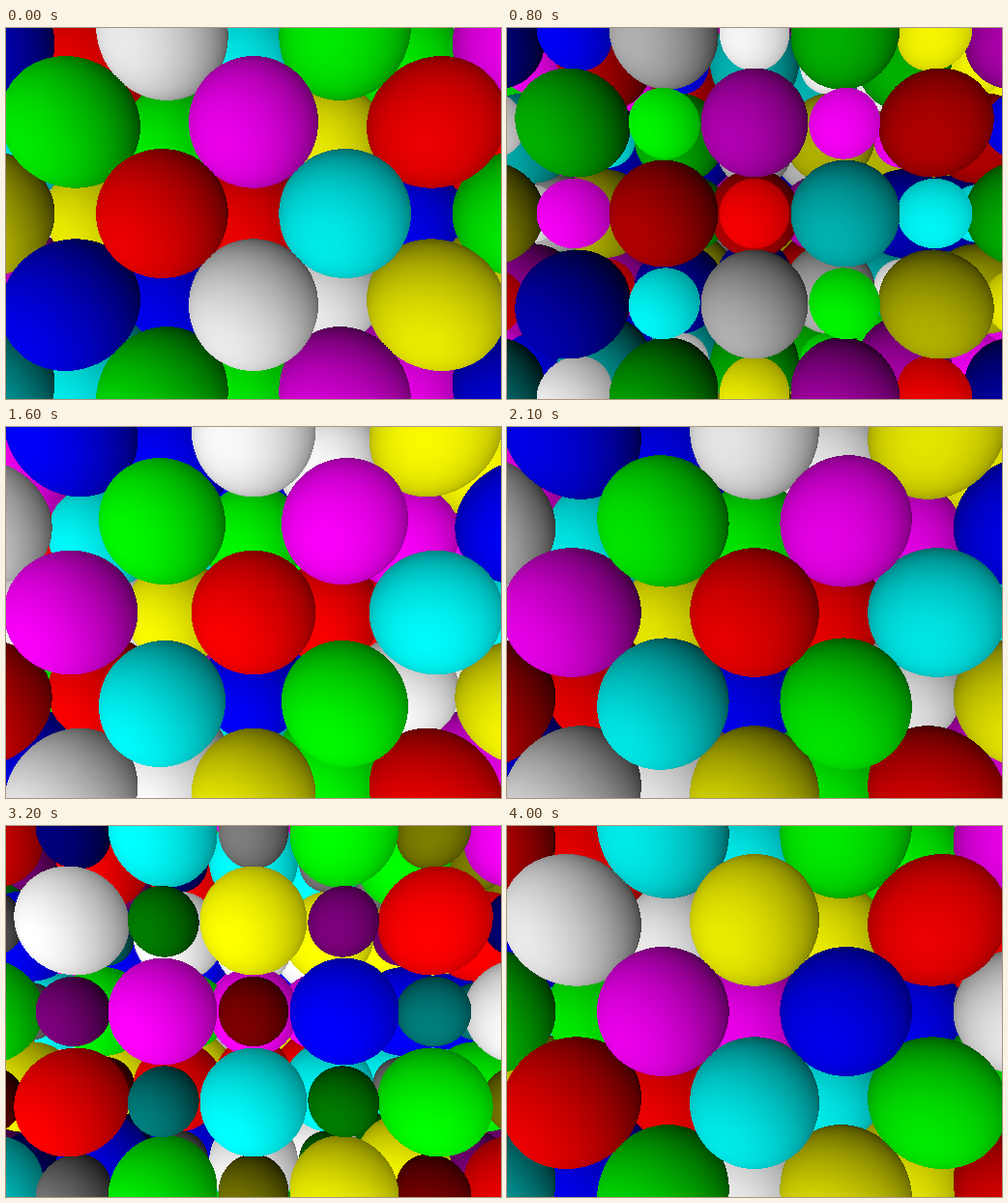
An HTML page with a canvas that plays this animation: 512x384 px, repeating every 4.1 s.

```html
<!DOCTYPE html>
<html lang="en">
<head>
<meta charset="utf-8">
<title>Slicing a 4D sphere packing</title>
<style>
  html, body { margin: 0; width: 100%; height: 100%; overflow: hidden; background: #000; }
  canvas { display: block; }
</style>
</head>
<body>
<canvas id="stage" width="512" height="384"></canvas>
<script>
// Ray-cast 3D slices through a 4D checkerboard lattice of hyperspheres.
const W = 512, H = 384, STEP = 100, STEPS = 41;
const FOCAL = H / 2 / Math.tan(Math.PI / 8), CAMERA = 5;
const RADIUS = 0.715, LAYERS = 8;
const LIGHT = { x: -0.36, y: -0.36, z: -0.66, w: -0.56 };
// red, cyan, green, magenta, blue, white, yellow
const PALETTE = [[1, 0, 0], [0, 1, 1], [0, 1, 0], [1, 0, 1], [0, 0, 1], [1, 1, 1], [1, 1, 0]];

const ctx = document.getElementById('stage').getContext('2d');
const image = ctx.createImageData(W, H);
const pixels = image.data;
const depth = new Float32Array(W * H);

function siteColor(x, y, z, w) {
  const n = (x + 5 * y - z + 7 * w + 7) / 2;
  const wrap = x + 2 * y + 2.4 * z + 4.2 * w < 3.5 ? 3 : 0;
  return PALETTE[(((n - wrap) % 7) + 7) % 7];
}

// Screen interval covered by a sphere along one axis.
function extent(pos, d, r, mid, max) {
  const q = FOCAL / (d * d - r * r);
  const center = mid + q * pos * d;
  const half = q * r * Math.sqrt(pos * pos + d * d - r * r);
  return [Math.max(0, Math.floor(center - half)), Math.min(max - 1, Math.ceil(center + half))];
}

function drawSphere(x, y, z, dw, r, color) {
  const d = z + CAMERA;
  const [x0, x1] = extent(x, d, r, W / 2, W);
  const [y0, y1] = extent(-y, d, r, H / 2, H);
  const c = x * x + y * y + d * d - r * r;
  const base = (dw * LIGHT.w - x * LIGHT.x - y * LIGHT.y - d * LIGHT.z) / RADIUS;
  for (let py = y0; py <= y1; py++) {
    const dy = (H / 2 - py - 0.5) / FOCAL;
    for (let px = x0; px <= x1; px++) {
      const dx = (px + 0.5 - W / 2) / FOCAL;
      const a = dx * dx + dy * dy + 1;
      const b = dx * x + dy * y + d;
      const disc = b * b - a * c;
      if (disc < 0) continue;
      const t = (b - Math.sqrt(disc)) / a;
      const i = py * W + px;
      if (t >= depth[i]) continue;
      depth[i] = t;
      const facing = base + t * (dx * LIGHT.x + dy * LIGHT.y + LIGHT.z) / RADIUS;
      const level = 255 * (0.5 + 0.5 * facing);
      for (let k = 0; k < 3; k++) pixels[i * 4 + k] = level * color[k];
    }
  }
}

function render(slice) {
  depth.fill(Infinity);
  for (let i = 0; i < pixels.length; i += 4) {
    pixels[i] = pixels[i + 1] = pixels[i + 2] = 0;
    pixels[i + 3] = 255;
  }
  for (let w = 0; w <= 2; w++) {
    const dw = slice - w;
    const r2 = RADIUS * RADIUS - dw * dw;
    if (r2 <= 0) continue;
    for (let z = 0; z < LAYERS; z++) {
      const nx = Math.ceil((z + CAMERA) * W / 2 / FOCAL + 0.8);
      const ny = Math.ceil((z + CAMERA) * H / 2 / FOCAL + 0.8);
      for (let y = -ny; y <= ny; y++) {
        for (let x = -nx; x <= nx; x++) {
          if ((x + y + z + w) & 1) drawSphere(x, y, z, dw, Math.sqrt(r2), siteColor(x, y, z, w));
        }
      }
    }
  }
  ctx.putImageData(image, 0, 0);
}

let shown = -1;
function tick() {
  const step = Math.floor(performance.now() / STEP) % STEPS;
  if (step !== shown) render((shown = step) / 20);
  requestAnimationFrame(tick);
}
tick();
</script>
</body>
</html>
```
